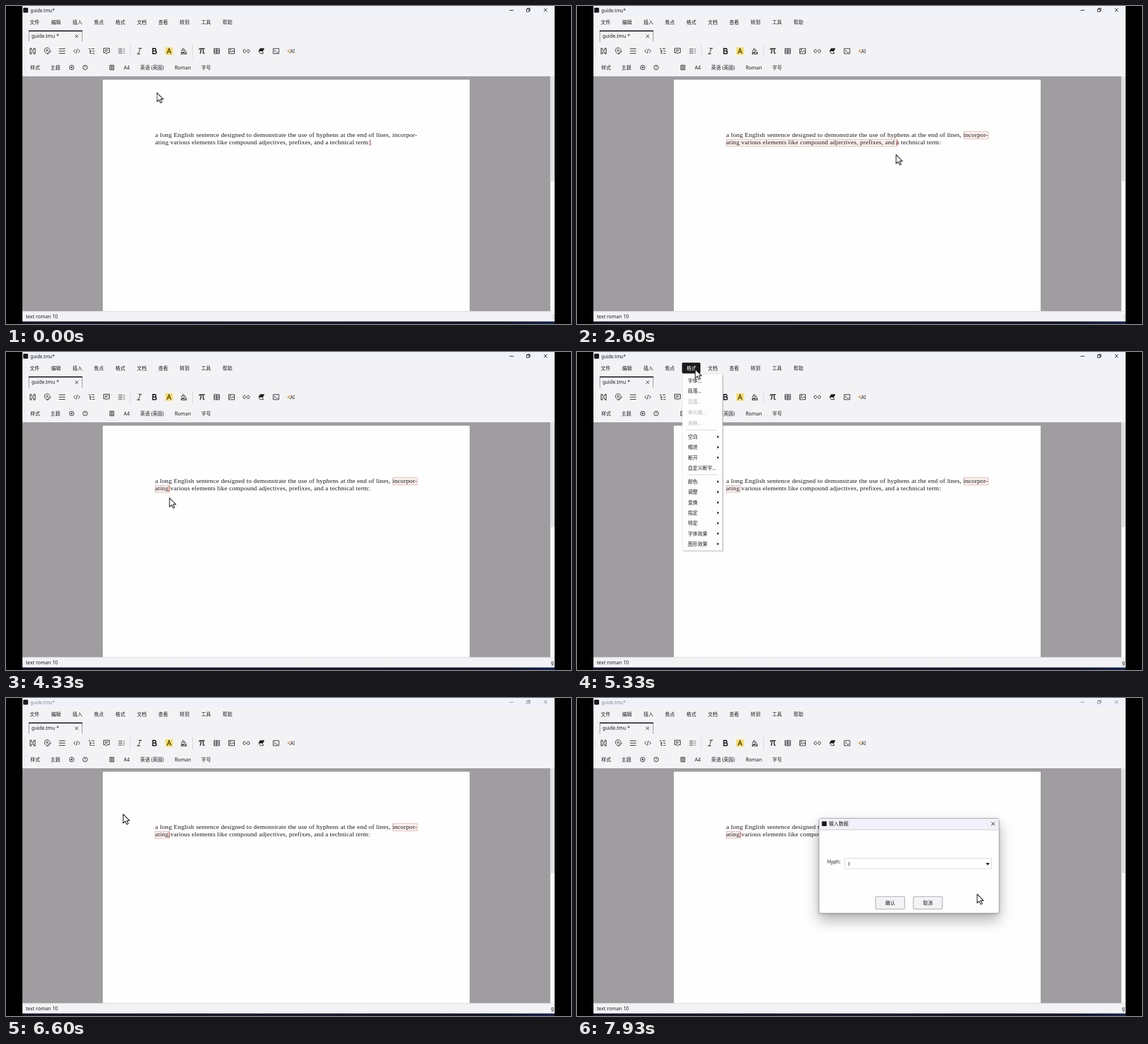
Animation of 998x561 px, one loop 8 s. Source, as an HTML page:

```html
<!DOCTYPE html>
<html lang="zh-CN">
<head>
<meta charset="utf-8">
<title>guide.tmu</title>
<style>
  html, body { margin: 0; width: 100%; height: 100%; overflow: hidden; background: #000; }
  #stage { position: absolute; left: 0; top: 0; width: 998px; height: 561px; overflow: hidden; }
  #stage > * { position: absolute; }
  svg { left: 0; top: 0; width: 998px; height: 561px; overflow: visible; }
  text { font: 8.6px "Noto Sans", "Noto Sans CJK SC", "Noto Sans CJK", sans-serif; fill: #1c1b1e; }
  .line { fill: none; stroke: #1c1b1e; stroke-width: 1; }
  .off { fill: #b5b4b7; }

  .doc { left: 263.6px; height: 13px; font: 11.4px/13px "Liberation Serif", "Noto Serif", serif;
    letter-spacing: .18px; color: #161616; white-space: nowrap; text-align: justify; text-align-last: justify; }
  .sel { box-sizing: border-box; height: 13.4px; background: #fcf0ee; border: 1px solid #e6b9b4; }

  /* Every moving part shares one 8 s clock; .step parts switch without easing. */
  .anim { animation: 8s linear infinite; }
  .step { animation-timing-function: step-end; }

  #sel1 { left: 682.5px; top: 221.3px; width: 44.5px; animation-name: sel1; }
  #sel2 { left: 262.5px; top: 234.6px; animation-name: sel2; }
  #caret { left: 0; top: 236px; width: 1px; height: 10px; background: #c9302c; animation-name: caret; }
  #caret::before, #caret::after { content: ""; position: absolute; left: -1px; width: 3px; height: 1px; background: #dd8d88; }
  #caret::before { top: 0; }
  #caret::after { bottom: 0; }
  #caretShow { left: 0; top: 0; animation-name: caretShow; }
  #caretShow > * { position: absolute; }

  #title { animation-name: dim; }
  #hover { animation-name: hover; }
  #popup { animation-name: popup; }
  #before { animation-name: before; }
  #after { animation-name: after; }
  #entry { animation-name: entry; }
  #dialog { left: 427px; top: 212px; width: 319px; height: 168px; box-sizing: border-box; background: #fefefe;
    border: 1px solid #a9a8ac; border-radius: 4px 4px 2px 2px;
    box-shadow: 0 12px 24px rgba(0,0,0,.3), 0 1px 5px rgba(0,0,0,.18); animation-name: dialog; }
  #dialog svg { position: absolute; left: -428px; top: -213px; }
  #mouse { animation-name: mouse; }

  @keyframes sel1 { 0% { opacity: 0 } 27.9%, 100% { opacity: 1 } }
  @keyframes sel2 {
    0%, 28.6% { opacity: 0; width: 381px }
    28.65%, 30% { opacity: 1; width: 381px; animation-timing-function: steps(46) }
    37.5%, 38.4% { opacity: 1; width: 141px; animation-timing-function: steps(21) }
    42.4%, 46.2% { opacity: 1; width: 36px; animation-timing-function: steps(2) }
    48.4%, 100% { opacity: 1; width: 26px }
  }
  @keyframes caret {
    0%, 27.9% { transform: translateX(643px); animation-timing-function: step-end }
    27.95%, 28.6% { transform: translateX(684px); animation-timing-function: step-end }
    28.65%, 30% { transform: translateX(643px); animation-timing-function: steps(46) }
    37.5%, 38.4% { transform: translateX(403px); animation-timing-function: steps(21) }
    42.4%, 46.2% { transform: translateX(298px); animation-timing-function: steps(2) }
    48.4%, 100% { transform: translateX(288px) }
  }
  @keyframes caretShow { 0% { opacity: 1 } 63.4% { opacity: 0 } 82.4%, 100% { opacity: 1 } }
  @keyframes dim { 0% { opacity: 1 } 82.4%, 100% { opacity: .48 } }
  @keyframes hover { 0% { opacity: 0 } 60% { opacity: 1 } 82.4%, 100% { opacity: 0 } }
  @keyframes popup { 0% { opacity: 0 } 64.2% { opacity: 1 } 82.4%, 100% { opacity: 0 } }
  @keyframes before { 0% { opacity: 1 } 49%, 100% { opacity: 0 } }
  @keyframes after { 0% { opacity: 0 } 49%, 100% { opacity: 1 } }
  @keyframes entry { 0% { opacity: 1 } 93.4% { opacity: 0 } 98.8%, 100% { opacity: 1 } }
  @keyframes dialog {
    0%, 83.3% { opacity: 0; transform: scale(.93); animation-timing-function: ease-out }
    86%, 100% { opacity: 1; transform: none }
  }
  @keyframes mouse {
    0%, 13.2% { transform: translate(266.5px, 153px); animation-timing-function: ease-in-out }
    20.8% { transform: translate(684.2px, 224.3px) }
    23.4%, 27.5% { transform: translate(684.5px, 225px) }
    30% { transform: translate(645px, 261px) }
    37.5%, 38.4% { transform: translate(402px, 265px); animation-timing-function: ease-out }
    42.4%, 45.9% { transform: translate(296.3px, 259px) }
    48.8%, 54.2% { transform: translate(288.8px, 257.5px); animation-timing-function: ease-in-out }
    61.6%, 67.4% { transform: translate(208.8px, 30.5px); animation-timing-function: ease-in-out }
    73.4% { transform: translate(207px, 198px) }
    76.6%, 84.5% { transform: translate(207px, 205px); animation-timing-function: ease-in }
    92.5% { transform: translate(545px, 300px); animation-timing-function: ease-out }
    99%, 100% { transform: translate(706.8px, 346px) }
  }
</style>
</head>
<body>
<div id="stage">
  <svg id="chrome">
    <defs>
      <linearGradient id="task">
        <stop offset="0" stop-color="#151527"/><stop offset=".5" stop-color="#1a192d"/>
        <stop offset=".9" stop-color="#14162b"/><stop offset="1" stop-color="#14234f"/>
      </linearGradient>
    </defs>
    <rect x="29" width="940" height="557" fill="#f3f2f5"/>
    <rect x="29" width="940" height="15" fill="#f0f2f9"/>
    <rect x="29" y="124" width="933" height="414.5" fill="#9f9da0"/>
    <rect x="171" y="130" width="648" height="408.5" fill="#fefefe"/>
    <rect x="961.5" y="124" width="7.5" height="414.5" fill="#fcfcfd"/>
    <rect x="961.5" y="124" width="7.5" height="185" fill="#e0dfe2"/>
    <rect x="29" y="538.5" width="940" height="1" fill="#e3e2e5"/>
    <rect x="29" y="556.5" width="940" height="5" fill="url(#task)"/>
    <rect x="30.3" y="3" width="8.7" height="8.7" rx="1.5" fill="#1b1b1d"/>
    <g id="title" class="anim step">
      <text x="43" y="10.7" style="font-size:8px">guide.tmu*</text>
      <path class="line" d="M889.5 7.5h7M919.5 5.5h4.5v4.5h-4.5zM921 5.5v-1.5h4.5v4.5h-1.5M950 4l6 6m0-6l-6 6"/>
    </g>
    <path d="M40.5 63V44M134.5 63V44" stroke="#8d8a92"/>
    <rect x="40" y="43" width="95" height="2" fill="#2c2431"/>
    <text x="45" y="56">guide.tmu *</text>
    <path class="line" d="M122 50.7l5.5 5.5m0-5.5l-5.5 5.5"/>
    <path d="M219.5 68v23M329.5 68v23" stroke="#d5d4d8"/>
    <path d="M32.5 70v19M32.5 99v19" stroke="#e9e8eb"/>
    <text x="35" y="551.2">text roman 10</text>
    <text id="before" class="anim step" x="965.7" y="551.2">:</text>
    <text id="after" class="anim step" x="962.6" y="551.2">g</text>

    <g class="line">
      <!-- heading, pin, paragraph, code, tree -->
      <path d="M42.5 74.5h2.5v3.5h4v-3.5h2.5v10h-2.5v-3.5h-4v3.5h-2.5z"/>
      <path d="M72.5 85c-3-3-4.500-4.500-4.500-6.500a4.700 4.700 0 0 1 9.300-1M73 85l1-2.500 4-4 1.300 1.300-4 4z"/>
      <circle cx="72.6" cy="78.3" r="1.5"/>
      <path d="M93.5 75.5h11M93.5 79.5h11M93.5 83.5h11"/>
      <path d="M122.5 76.5l-3 3 3 3M127.5 76.5l3 3-3 3M126 75.5l-2 8"/>
      <path d="M146 75.5h3M151 75.5h5M148.5 77v6.5h2.5M148.5 79.5h2.5M152.5 79.5h4M152.5 83.5h4"/>
      <!-- note, list -->
      <path d="M172.5 74.5h10v8h-3.5l-1.5 2-1.5-2h-3.5zM174.5 77.5h6M174.5 79.8h4"/>
      <path d="M198.5 76h7M198.5 79.5h7M198.5 83h7M207.5 76h2M207.5 79.5h2M207.5 83h2"/>
      <!-- italic, bold, highlight, ink -->
      <path d="M234 74.5h6M231 84.5h6M237.3 74.5l-3.5 10"/>
      <path stroke-width="1.8" d="M259.3 75h3.2a2.2 2.2 0 0 1 0 4.4h-3.2zM259.3 79.4h3.9a2.4 2.4 0 0 1 0 4.8h-3.9z"/>
      <rect x="281.5" y="73" width="13" height="13" fill="#f8dd5c" stroke="none"/>
      <path stroke-width="1.1" d="M284.5 84l3.5-9 3.5 9M285.8 81h4.4"/>
      <path d="M313 74.5l3.7 3.7-3 3.3h-2.3l-1.8-1.8zM311 76.5l4.5 3M318 79.5v2"/>
      <rect x="309.5" y="82.5" width="9" height="2.2"/>
      <!-- math, table, picture, link -->
      <path stroke-width="1.6" d="M341 77c.5-1.5 1-1.7 2-1.7h8M344.5 75.5c0 4-.3 6.5-1.8 8.5M348.3 75.5v6.5c0 1.8 1.3 2 2.5 1"/>
      <path d="M367.5 75h9.5v9h-9.5zM367.5 78h9.5M367.5 81h9.5M372.2 75v9"/>
      <path d="M393.5 75h10v9h-10zM393.5 82.5l3-3 2 2 2.5-3 2.5 3"/>
      <circle cx="396.3" cy="77.4" r=".8"/>
      <path d="M423 76.8h-1.5a2.7 2.7 0 0 0 0 5.4h1.5M426 76.8h1.5a2.7 2.7 0 0 1 0 5.4h-1.5M422 79.5h5"/>
      <!-- fold, console -->
      <path fill="#1c1b1e" d="M449 75h7l-2.5 4.5h-7z"/>
      <path d="M446.5 80l2.5 3.8h5.5l-1.5-4"/>
      <path d="M472 75h10v9h-10zM474 77.5l2 1.7-2 1.7M477 81.5h3"/>
      <!-- second row: add, help, page -->
      <circle cx="116" cy="108.5" r="4"/>
      <path d="M114 108.5h4M116 106.5v4"/>
      <circle cx="139.8" cy="108.5" r="4"/>
      <path d="M183.5 104.5h7v8h-7zM185 106.5h4M185 108.5h4M185 110.5h4"/>
    </g>
    <text x="138.3" y="110.9" style="font-size:6.5px">?</text>
    <path d="M499 76.5l.9 2 2 .9-2 .9-.9 2-.9-2-2-.9 2-.9z" fill="#e39a3c"/>
    <circle cx="501.7" cy="82" r=".9" fill="#4e8a63"/>
    <circle cx="501.7" cy="76.7" r=".7" fill="#c7503f"/>
    <text x="502.3" y="82.5" style="font-size:8px">AI</text>
  </svg>

  <div id="sel1" class="sel anim step"></div>
  <div id="sel2" class="sel anim"></div>
  <div class="doc" style="top:220.7px;width:462.6px">a long English sentence designed to demonstrate the use of hyphens at the end of lines, incorpor-</div>
  <div class="doc" style="top:233.7px;width:379.4px">ating various elements like compound adjectives, prefixes, and a technical term:</div>
  <div id="caretShow" class="anim step"><div id="caret" class="anim"></div></div>

  <svg>
    <g id="hover" class="anim step">
      <rect x="185.5" y="18.8" width="32.5" height="19" rx="2" fill="#1a191b"/>
      <text x="193.4" y="31.7" style="fill:#fff">格式</text>
    </g>
    <g id="popup" class="anim step">
      <rect x="187.5" y="41" width="70.8" height="310.5" fill="#8f8d91" opacity=".75"/>
      <rect x="186" y="39" width="71" height="311.3" fill="#fdfdfe" stroke="#d9d8dc" stroke-width=".6"/>
      <path d="M194 137.5h54M194 216.5h54" stroke="#d4d3d7"/>
    </g>
  </svg>

  <div id="dialog" class="anim">
    <svg>
      <path d="M428 232v-16q0-3 3-3h311q3 0 3 3v16z" fill="#f0f1f9"/>
      <path d="M428 232.5h317" stroke="#c9c8cf"/>
      <rect x="432.5" y="217.5" width="8.5" height="8.5" rx="1.5" fill="#1b1b1d"/>
      <text x="445" y="225.2">输入数据</text>
      <path class="line" d="M731.8 218.7l6.4 6.4m0-6.4l-6.4 6.4"/>
      <text x="442" y="291.5">Hyph:</text>
      <rect x="473" y="283" width="259.5" height="18" fill="#fff" stroke="#d3d2d6"/>
      <path d="M722 291h7l-3.5 4.3z" fill="#1b1b1d"/>
      <path id="entry" class="anim step" d="M480.6 289.3v6.7" stroke="#333"/>
      <g fill="#f3f2f5" stroke="#b3b1b6" stroke-width="1.3">
        <rect x="527.5" y="350.3" width="51.3" height="22" rx="2.5"/>
        <rect x="594" y="350.3" width="51.5" height="22" rx="2.5"/>
      </g>
      <text x="544.6" y="364.8">确认</text>
      <text x="611.2" y="364.8">取消</text>
    </svg>
  </div>

  <svg>
    <path id="mouse" class="anim" d="M0 0V15.8L3.7 12.4L6.4 18L9 16.8L6.4 11.4H11.3Z" fill="#fff" stroke="#111" stroke-width="1.2" stroke-linejoin="round"/>
  </svg>
</div>
<script>
  const label = (x, y, s, cls = "") => `<text x="${x}" y="${y}" class="${cls}">${s}</text>`;
  const add = (id, html) => document.getElementById(id).insertAdjacentHTML("beforeend", html);

  const bar = "文件 编辑 插入 焦点 格式 文档 查看 转到 工具 帮助".split(" ");
  add("chrome", bar.map((s, i) => label(41.9 + 37.85 * i, 31.7, s)).join(""));

  const row = [[43, "样式"], [78.6, "主题"], [208, "A4"], [237, "英语 (英国)"], [298, "Roman"], [345, "字号"]];
  add("chrome", row.map(([x, s]) => label(x, 112, s)).join(""));

  // Each group starts at y; "-" marks a disabled item, ">" one with a submenu.
  const groups = [
    [50.5, 18.75, "字体... 段落... -页面... -单元格... -表格..."],
    [149.7, 18.3, ">空白 >缩进 >断开 自定义断字..."],
    [228.8, 18.3, ">颜色 >调整 >变换 >指定 >特定 >字体效果 >图形效果"]
  ];
  for (const [top, step, items] of groups) {
    items.split(" ").forEach((s, i) => {
      const y = top + step * i;
      add("popup", label(196, y + 3.2, s.replace(/^[->]/, ""), s[0] === "-" ? "off" : ""));
      if (s[0] === ">") add("popup", `<path d="M247.7 ${y - 2.5}l3.3 2.5-3.3 2.5z" fill="#1b1b1d"/>`);
    });
  }
</script>
</body>
</html>
```
